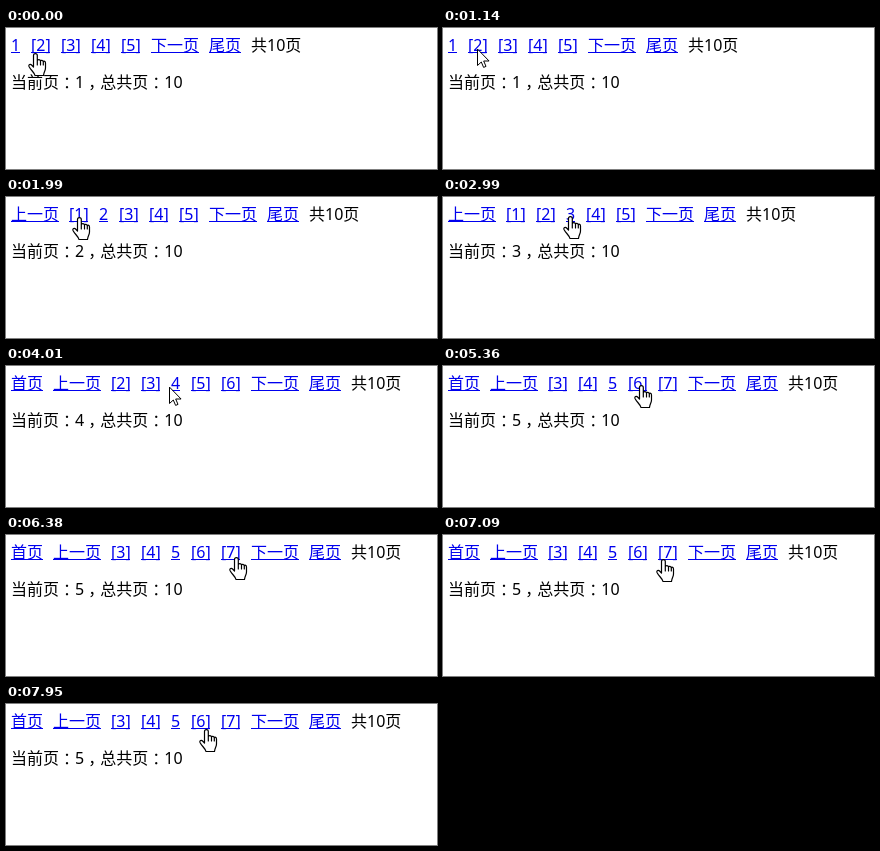
An HTML page for the animation above (8000 ms loop, 431 by 141 pixels).

```html
<!DOCTYPE html>
<html lang="zh-CN">
<head>
<meta charset="utf-8">
<style>
html, body { margin: 0; width: 100%; height: 100%; overflow: hidden; background: #fff; }
svg { display: block; width: 431px; height: 141px; cursor: default; }
text { font: 16px "Noto Sans", "Noto Sans CJK SC", "Noto Sans CJK", sans-serif; }
.link { fill: #00e; }
#hand, #arrow { fill: #fff; stroke: #000; stroke-linejoin: round; stroke-linecap: round; }
#hand { stroke-width: 1.2; }
</style>
</head>
<body>
<svg viewBox="0 0 431 141">
  <g id="page"></g>
  <g id="pointer">
    <path id="arrow" d="M.5.5V16.5L4.3 13 6.6 18.4 9 17.4 6.7 12H11.7Z"/>
    <path id="hand" transform="translate(-6 0)" d="M5.5 14V2.5a1.9 1.9 0 0 1 3.8 0V8c0-1.8 3-1.8 3.2.3c.3-1.6 2.6-1.2 2.8.6c.5-1.2 2.2-.6 2.2 1V15c0 3-1.7 4-2 7.5H7C6.5 19.5 3 17.5 1 13.5C.2 11.5 2.4 10.6 3.6 12ZM9.3 8v4M12.5 8.3V12M15.3 8.9V12"/>
  </g>
</svg>
<script>
const LOOP = 8000, TOTAL = 10, TICK = 75, PRESS = 80;
const $ = id => document.getElementById(id);

// Times at which pages 2, 3, 4 and 5 open
const turns = [1220, 2620, 3710, 5360];

// Pointer glides: first and last moment, then the resting point
const start = [28, 25];
const glides = [
  [70, 290, 18, 15],
  [450, 920, 34, 21],
  [1760, 2360, 124, 19],
  [2990, 3470, 161, 21],
  [4010, 4810, 231, 19],
  [4870, 5110, 197, 19],
  [5580, 5680, 218, 19],
  [6230, 6605, 239, 25],
  [6690, 7090, 219, 24],
  [7310, 7950, 199, 25]
];

function layout(page) {
  const first = Math.max(1, page - 2);
  const labels = [];
  if (page > 3) labels.push("首页");
  if (page > 1) labels.push("上一页");
  for (let n = first; n < first + 5; n++) labels.push(n === page ? `${n}` : `[${n}]`);
  labels.push("下一页", "尾页", `共${TOTAL}页`);
  let x = 5;
  return labels.map(label => {
    const numeric = /^[\[\d]/.test(label);
    const step = numeric ? 10 + 10 * Math.min(label.length, 2) : label.length * 16 + 10;
    const item = { label, x, width: step - (numeric ? 11 : 10), link: !label.startsWith("共") };
    x += step;
    return item;
  });
}

// Sets full-width punctuation in the middle of its cell
const centred = text =>
  text.replace(/([：，])(.)/g, '<tspan dx="4">$1</tspan><tspan dx="-4">$2</tspan>');

let shown, items;
function showPage(page) {
  if (page === shown) return;
  shown = page;
  items = layout(page);
  $("page").innerHTML = items.map(({ label, x, width, link }) => link
    ? `<g class="link"><text x="${x}" y="23">${label}</text><rect x="${x}" y="24" width="${width}" height="1"/></g>`
    : `<text x="${x}" y="23">${label}</text>`).join("") +
    `<text x="5" y="60">${centred(`当前页：${page}，总共页：${TOTAL}`)}</text>`;
}

const smooth = p => p * p * (3 - 2 * p);
const ticks = ms => Math.floor(ms / TICK) + 1;

function pointerAt(t) {
  let [x, y] = start;
  for (const [from, to, endX, endY] of glides) {
    if (t < from) break;
    const part = t >= to ? 1 : smooth(ticks(t - from) / ticks(to - from));
    x += (endX - x) * part;
    y += (endY - y) * part;
  }
  return [Math.round(x), Math.round(y)];
}

function draw(t) {
  showPage(1 + turns.filter(turn => t >= turn).length);
  const [x, y] = pointerAt(t);
  const pressed = turns.some(turn => t >= turn - PRESS && t < turn);
  const onLink = !pressed && items.some(i => i.link && x >= i.x && x <= i.x + i.width);
  $("pointer").setAttribute("transform", `translate(${x} ${y})`);
  $("hand").style.display = onLink ? "" : "none";
  $("arrow").style.display = onLink ? "none" : "";
}

const begin = performance.now();
function tick() {
  draw((performance.now() - begin) % LOOP);
  requestAnimationFrame(tick);
}
tick();
</script>
</body>
</html>
```
